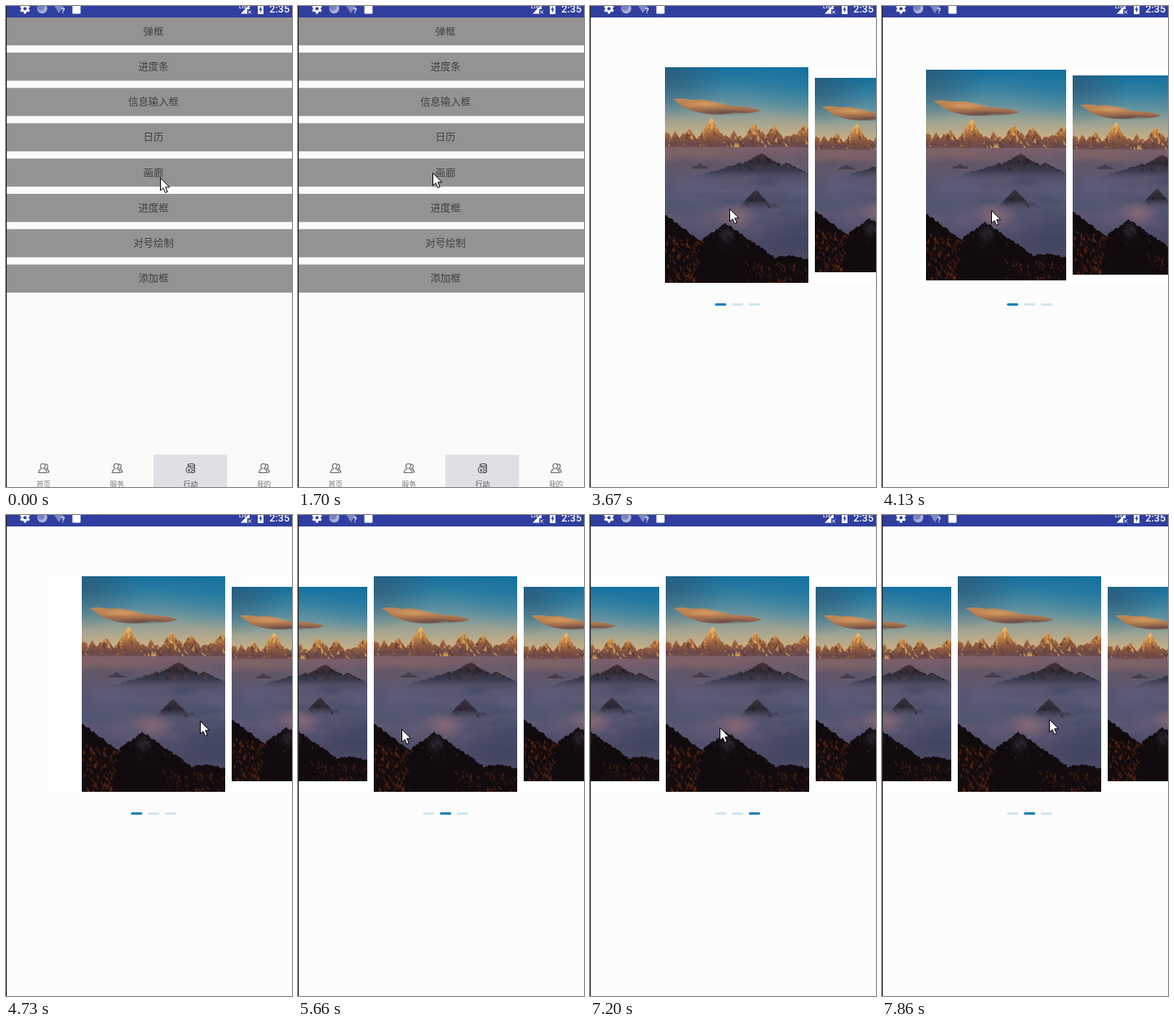
An HTML page with a canvas for the animation above (8000 ms loop, 351 by 589 pixels).

```html
<!DOCTYPE html>
<html lang="zh-CN">
<head>
<meta charset="utf-8">
<style>
html, body { margin: 0; width: 100%; height: 100%; overflow: hidden; background: #fafafa; }
canvas { display: block; width: 351px; height: 589px; }
</style>
</head>
<body>
<canvas id="stage"></canvas>
<script>
const W = 351, H = 589, LOOP = 8000, PW = 176, PH = 264;
const OPEN = 2570, OPENED = 2690;
const CJK = '"Noto Sans CJK SC", "Noto Sans CJK", sans-serif';
const cv = document.getElementById('stage');
const dpr = window.devicePixelRatio || 1;
cv.width = W * dpr;
cv.height = H * dpr;
const c = cv.getContext('2d');

// Bursts of screen refreshes: first, last, count
const bursts = [[0, 0, 1], [150, 280, 2], [580, 850, 3], [1130, 1700, 5], [OPEN, OPENED, 2],
  [2970, 3970, 8], [4130, 5120, 8], [5240, 6230, 8], [7200, 7860, 6]];
// Eased moves: from, to, pointer dx, dy, pages scrolled
const moves = [[150, 850, -3, -7, 0], [1130, 1410, -9, -5, 0], [1410, 1700, -12, 6, 0],
  [2970, 3600, 7, 44, 0], [3650, 3970, -43, 2, .245], [4050, 4690, 109, 2, -.245],
  [4800, 5240, -118, 10, 1], [5400, 5660, 7, 0, 0], [5760, 6230, -15, 0, 1],
  [6230, 7200, 47, -2, 0], [7230, 7800, 46, -10, -1]];

function refreshTime(ms) {
  const [a, b, n] = bursts.filter(s => s[0] <= ms).pop();
  if (n === 1) return a;
  const gap = (b - a) / (n - 1);
  return a + gap * Math.min(n - 1, Math.floor((ms - a) / gap + .15));
}

function poseAt(t) {
  const pose = { x: 189, y: 210, page: 0 };
  for (const [from, to, dx, dy, pages] of moves) {
    const u = Math.max(0, Math.min(1, (t - from) / (to - from))), e = u * u * (3 - 2 * u);
    pose.x += dx * e;
    pose.y += dy * e;
    pose.page += pages * e;
  }
  return pose;
}

function rng(seed) {
  return () => (seed = (seed * 16807) % 2147483647) / 2147483647;
}

function fade(g, y0, y1, ...stops) {
  const f = g.createLinearGradient(0, y0, 0, y1);
  stops.forEach((s, i) => f.addColorStop(i / (stops.length - 1), s));
  return f;
}

function box(g, x, y, w, h, fill) {
  g.fillStyle = fill;
  g.fillRect(x, y, w, h);
}

function paintPhoto() {
  const s = 2, o = document.createElement('canvas');
  o.width = PW * s;
  o.height = PH * s;
  const g = o.getContext('2d'), rnd = rng(77);
  g.scale(s, s);

  // Skyline of peaks [x, y, slope], cut off at base
  function ridge(peaks, rough, base, fill) {
    const p = new Path2D();
    p.moveTo(-2, base);
    for (let x = -2; x <= PW + 2; x += 1.5) {
      const y = Math.min(...peaks.map(([px, py, k]) => py + k * Math.abs(x - px)));
      p.lineTo(x, Math.min(base, y + (rnd() - .5) * rough));
    }
    p.lineTo(PW + 2, base);
    g.fillStyle = fill;
    g.fill(p);
    return p;
  }
  function dabs(path, n, x, y, w, h, size, ...colors) {
    g.save();
    g.clip(path);
    for (let i = 0; i < n; i++) {
      const l = size * (.4 + rnd()), d = l * (rnd() * 1.2 - .4);
      g.save();
      g.translate(x + rnd() * w, y + rnd() * h);
      g.fillStyle = colors[i % colors.length];
      g.beginPath();
      g.moveTo(0, 0);
      g.lineTo(d + l * .35, l);
      g.lineTo(d - l * .2, l * .8);
      g.fill();
      g.restore();
    }
    g.restore();
  }
  function puff(x, y, rx, ry, rgb, a) {
    g.save();
    g.translate(x, y);
    g.scale(rx, ry);
    const f = g.createRadialGradient(0, 0, 0, 0, 0, 1);
    f.addColorStop(0, `rgba(${rgb},${a})`);
    f.addColorStop(1, `rgba(${rgb},0)`);
    box(g, -1, -1, 2, 2, f);
    g.restore();
  }

  // sky and cloud
  box(g, 0, 0, PW, 105, fade(g, 0, 88, '#14709f', '#3480a2', '#64939f', '#a3a592', '#cfb183'));
  puff(0, 12, 75, 55, '52,80,102', .6);
  puff(176, 22, 80, 45, '14,112,160', .4);
  g.fillStyle = fade(g, 38, 58, '#c08a58', '#b57b4e', '#79574f');
  g.fill(new Path2D('M10 39Q22 37 34 40Q48 38 62 43Q78 48 96 48Q110 50 118 53Q104 58 86 55Q70 59 52 57Q32 54 22 48Q16 43 10 39Z'));
  puff(50, 45, 32, 5, '223,165,104', .7);
  puff(75, 55, 38, 4, '92,66,68', .6);

  // sunlit range
  const crags = [[57, 61, 1.7], [30, 75, 1.3], [110, 68, 1.5], [134, 71, 1.3], [172, 71, 1.1]];
  for (let x = 2; x < PW; x += 9) crags.push([x + rnd() * 5, 77 + rnd() * 9, 1 + rnd()]);
  const range = ridge(crags, 2.5, 106, fade(g, 62, 104, '#efc173', '#d4954c', '#976040', '#68484a', '#715861'));
  dabs(range, 260, 0, 66, PW, 28, 6, 'rgba(92,58,48,.6)', 'rgba(238,180,92,.6)', 'rgba(140,84,52,.6)');

  // sea of mist
  box(g, 0, 98, PW, 166, fade(g, 98, 220, '#7c606a', '#625869', '#565571', '#52566f', '#585370', '#4a4964'));
  puff(30, 106, 80, 12, '140,104,98', .5);
  for (let i = 0; i < 70; i++) {
    puff(rnd() * PW, 112 + rnd() * 95, 12 + rnd() * 25, 4 + rnd() * 9, rnd() < .4 ? '122,104,126' : '56,68,98', .2);
  }
  puff(42, 150, 38, 26, '104,101,134', .5);
  puff(165, 150, 30, 16, '100,102,134', .5);
  puff(160, 202, 55, 30, '44,58,86', .55);

  // islands of rock
  ridge([[43, 118, .5]], 1.5, 124, '#453d4e');
  const crest = ridge([[118, 105, .6], [94, 117, .3], [150, 117, .5]], 2.5, 137,
    fade(g, 106, 137, '#463034', '#322b35', '#3c3b50', 'rgba(74,74,100,0)'));
  dabs(crest, 50, 92, 106, 75, 16, 6, 'rgba(108,66,54,.4)', 'rgba(24,22,30,.5)');
  const rock = ridge([[112, 150, 1], [134, 167, .4]], 2, 176,
    fade(g, 150, 176, '#40333c', '#2a2936', 'rgba(74,68,92,0)'));
  dabs(rock, 24, 98, 152, 32, 16, 5, 'rgba(96,68,70,.4)', 'rgba(22,22,32,.5)');
  puff(86, 183, 28, 20, '170,120,124', .6);
  puff(62, 182, 36, 18, '116,96,120', .45);

  // dark foreground
  const fore = ridge([[0, 180, .75], [75, 191, .7], [150, 230, .2]], 3, 265, '#110b0e');
  puff(76, 205, 13, 16, '62,56,72', .5);
  dabs(fore, 40, 58, 192, 46, 28, 6, 'rgba(66,60,76,.4)', 'rgba(20,16,22,.7)');
  dabs(fore, 150, 0, 204, 42, 56, 6, 'rgba(120,50,22,.6)', 'rgba(84,34,18,.6)', '#1c0e0d');
  dabs(fore, 120, 100, 236, 76, 28, 5, 'rgba(104,44,22,.6)', 'rgba(66,28,20,.6)', '#180d0e');
  return o;
}
const photo = paintPhoto();

function label(s, x, y, font, fill, align = 'center') {
  c.font = font;
  c.textAlign = align;
  c.fillStyle = fill;
  c.fillText(s, x, y);
}

function disc(x, y, r, fill) {
  c.fillStyle = fill;
  c.beginPath();
  c.arc(x, y, r, 0, 7);
  c.fill();
}

function shape(d, x, y, fill, line, width = 1) {
  const p = new Path2D(d);
  c.save();
  c.translate(x, y);
  if (fill) { c.fillStyle = fill; c.fill(p); }
  if (line) { c.strokeStyle = line; c.lineWidth = width; c.stroke(p); }
  c.restore();
}

function statusBar() {
  box(c, 0, 0, W, 14, '#303f9f');
  for (let i = 0; i < 6; i++) {
    c.save();
    c.translate(23.3, 3.2);
    c.rotate(i * Math.PI / 3);
    box(c, -1.5, -6.2, 3, 3, '#fff');
    c.restore();
  }
  disc(23.3, 3.2, 4.7, '#fff');
  disc(23.3, 3.2, 2, '#303f9f');
  disc(44.5, 3, 6.2, '#aab0d8');
  disc(43, 1.5, 4.3, '#7882bf');
  shape('M0 -2L14 -2L7 9Z', 58, 0, '#7d87c4');
  label('?', 70, 8.5, 'bold 9px Roboto, sans-serif', '#fff');
  shape('M0 0H10V9Q10 10 9 10H1Q0 10 0 9Z', 81.5, -.5, '#fff');
  shape('M0 9.5L11 -2V4H8V9.5Z', 288, 0, '#fff');
  label('LTE', 286, 3, 'bold 6px Roboto, sans-serif', '#fff', 'left');
  shape('M0 0L4 4M4 0L0 4', 297, 5.5, null, '#fff');
  box(c, 309, -2, 7, 12, '#fff');
  shape('M4 0L1.5 5H3.2L3 8.5L5.5 3.5H4Z', 309, 0, '#303f9f');
  label('2:35', 348, 8.3, '500 12.5px Roboto, sans-serif', '#fff', 'right');
}

function people(x, y) {
  shape('M-2 0C-5 -2 -4 -6 -1 -6C3 -6 3 -2 0 0C3 1 4 3 4 5H-6C-6 3 -5 1 -2 0M2 -5.5C6 -6 6 -1 3.5 0C6 1 6.5 3 6.5 4.5H5',
    x, y, null, '#686868', 1.1);
}

function coins(x, y) {
  shape('M-3 -3V-5Q1 -7 5 -5V4Q3 5.5 1 5M-3 -4Q1 -2 5 -4M2 -1H5M2 2H5', x, y, null, '#4c4c52', 1.1);
  shape('M2 1.5A3.7 3.7 0 1 1 -5.4 1.5A3.7 3.7 0 1 1 2 1.5M-3 0L-1.7 1.5L-.4 0M-1.7 1.5V4M-3 2.3H-.4', x, y, null, '#4c4c52');
}

function listPage() {
  box(c, 0, 13, W, H, '#fafafa');
  ['弹框', '进度条', '信息输入框', '日历', '画廊', '进度框', '对号绘制', '添加框'].forEach((s, i) => {
    const y = 13.8 + i * 43.25;
    box(c, 0, y, W, 34.4, '#939393');
    label(s, 181, y + 21.8, '12.4px ' + CJK, '#414141');
  });
  box(c, 181, 549.5, 90.3, 40, '#dfe0e6');
  ['首页', '服务', '行动', '我的'].forEach((s, i) => {
    const x = 46 + i * 90.2;
    (i === 2 ? coins : people)(x, 566.5);
    label(s, x, 589, '8.7px ' + CJK, i === 2 ? '#55555c' : '#777');
  });
}

function galleryPage(t, page) {
  box(c, 0, 13, W, H, '#fcfcfc');
  if (t > OPENED) {
    const x = t < 3800 ? 266 : t < 4800 ? 50 : 1;
    box(c, x, 75, W - x, 265, '#fff');
  }
  for (let i = 0; i < 5; i++) {
    const d = i - page, k = 1 - .1 * Math.min(1, Math.abs(d));
    c.drawImage(photo, 181 + d * 175.5 - PW * k / 2, 207 - PH * k / 2, PW * k, PH * k);
  }
  for (let i = 0; i < 3; i++) {
    c.fillStyle = i === Math.round(page) ? '#1f82b8' : '#cfe8f1';
    c.beginPath();
    c.roundRect(153.3 + i * 20.8, 364, 14, 3, 1.5);
    c.fill();
  }
}

function draw(ms) {
  const t = refreshTime(ms), { x, y, page } = poseAt(t);
  c.setTransform(dpr, 0, 0, dpr, 0, 0);
  if (t < OPENED) listPage();
  if (t >= OPEN) {
    c.save();
    if (t < OPENED) {
      c.globalAlpha = .6;
      c.translate(0, 12);
    }
    galleryPage(t, page);
    c.restore();
  }
  statusBar();
  box(c, 0, 0, 1, H, '#262626');
  shape('M.5 .5V16L4 12.8L6.6 18.5L9.2 17.4L6.7 11.8H11.6Z', Math.round(x), Math.round(y), '#fff', '#000');
}

const start = performance.now();
function loop() {
  draw((performance.now() - start) % LOOP);
  requestAnimationFrame(loop);
}
loop();
</script>
</body>
</html>
```
